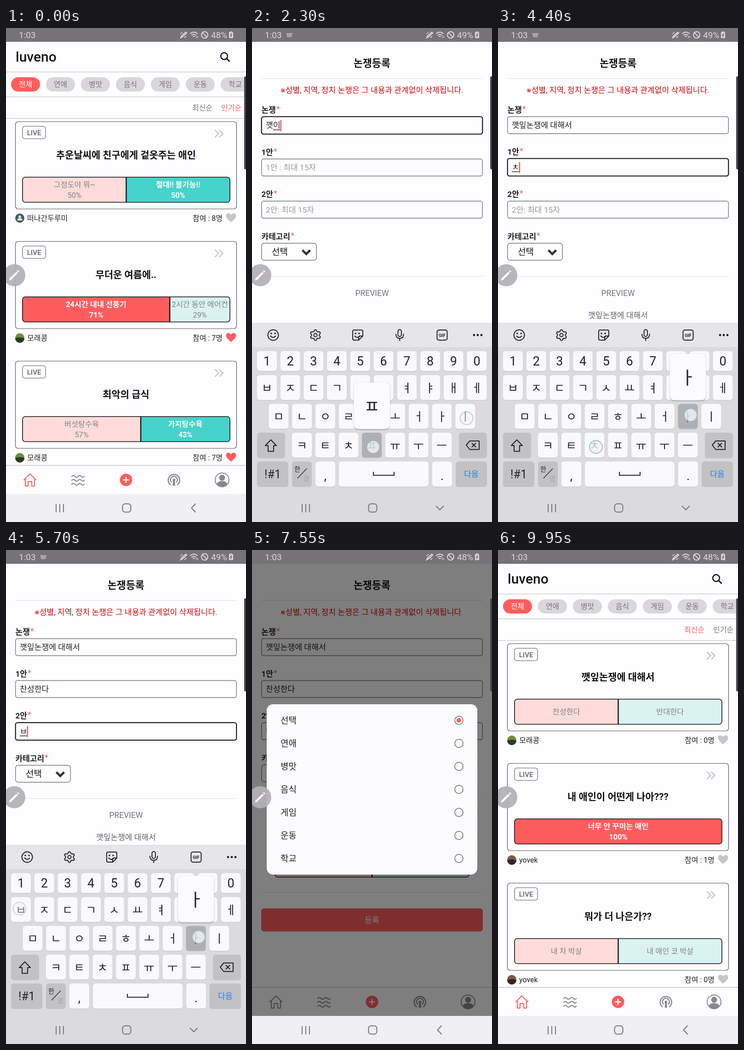
Write an HTML page that moves like this. It is 522 px wide and 1073 px high and loops after 10000 ms.

```html
<!DOCTYPE html>
<html lang="ko">
<head>
<meta charset="utf-8">
<title>Debate app</title>
<style>
html, body { margin: 0; width: 100%; height: 100%; overflow: hidden; background: #fefdff; }
svg { display: block; width: 100vw; height: 100vh; }
text { font-family: Roboto, "Noto Sans CJK KR", "Noto Sans CJK", sans-serif; white-space: pre; }
</style>
</head>
<body>
<svg id="stage" viewBox="0 0 522 1073"></svg>
<script>
const LOOP = 10000;
const RED = '#ff5d5d', PINK = '#ffdcdb', TEAL = '#46d3ca', MINT = '#daf3f0', WHITE = '#fefdff';

// ---------- markup helpers ----------
const text = (x, y, s, size, fill, anchor = 'start', weight = 400, id = '') =>
  `<text x="${x}" y="${y}" font-size="${size}" fill="${fill}" text-anchor="${anchor}" font-weight="${weight}" id="${id}">${s}</text>`;
const mid = (x, y, s, size, fill, weight, id) => text(x, y, s, size, fill, 'middle', weight, id);
const rect = (x, y, w, h, fill, r = 0, extra = '') =>
  `<rect x="${x}" y="${y}" width="${w}" height="${h}" rx="${r}" fill="${fill}" ${extra}/>`;
const circle = (x, y, r, fill, extra = '') => `<circle cx="${x}" cy="${y}" r="${r}" fill="${fill}" ${extra}/>`;
const line = (d, color, w = 2, extra = '') =>
  `<path d="${d}" fill="none" stroke="${color}" stroke-width="${w}" ${extra}/>`;
const shape = (d, fill, extra = '') => `<path d="${d}" fill="${fill}" ${extra}/>`;
const group = (id, body, extra = '') => `<g id="${id}" ${extra}>${body}</g>`;
const at = (x, y, body) => `<g transform="translate(${x} ${y})">${body}</g>`;
const round = 'stroke-linecap="round" stroke-linejoin="round"';

// ---------- home ----------
const CATS = ['연애', '병맛', '음식', '게임', '운동', '학교'];
const KONG = ['모래콩', '#6f8f3c', '#2c3b26'], YOV = ['yovek', '#7a5a4c', '#2f2a2b'];
const HOT = [
  { title: '추운날씨에 친구에게 겉옷주는 애인', a: '그정도야 뭐~', b: '절대!! 불가능!!', pct: 50, win: 'b', by: ['떠나간두루미', '#455a64', ''], n: 8 },
  { title: '무더운 여름에..', a: '24시간 내내 선풍기', b: '2시간 동안 에어컨', pct: 71, win: 'a', by: KONG, n: 7, liked: 1 },
  { title: '최악의 급식', a: '버섯탕수육', b: '가지탕수육', pct: 57, win: 'b', by: KONG, n: 7, liked: 1 }
];
const FRESH = [
  { title: '깻잎논쟁에 대해서', a: '찬성한다', b: '반대한다', by: KONG, n: 0 },
  { title: '내 애인이 어떤게 나아???', a: '너무 안 꾸미는 애인', pct: 100, win: 'a', by: YOV, n: 1 },
  { title: '뭐가 더 나은가??', a: '내 차 박살', b: '내 애인 코 박살', by: YOV, n: 0 }
];
const HEART = 'M0 9.5C-4 5.5-11 1-11-4.500C-11-11-3-12 0-6.500C3-12 11-11 11-4.500C11 1 4 5.500 0 9.500Z';

function choice(cx, label, pct, won) {
  const color = won ? '#fff' : '#858284', weight = won ? 700 : 400;
  if (pct === undefined) return mid(cx, 154, label, 16.3, color, weight);
  return mid(cx, 143, label, 16.3, color, weight) + mid(cx, 166, pct + '%', 16.3, color, weight);
}

function avatar([, main, shade]) {
  if (!shade) return circle(30, 210, 10, main) + circle(30, 207, 3, '#dfe6ea') + shape('M24 215a6 5 0 0 1 12 0z', '#dfe6ea');
  return circle(30, 210, 10, main) + shape('M20 211a10 10 0 0 0 20 0q-10 -4 -20 0z', shade);
}

function card(c, i) {
  const split = 36 + 451 * (c.pct ?? 50) / 100;
  let bar = rect(36, 121, 451, 54.5, c.win === 'a' ? RED : PINK, 6);
  if (c.b) {
    bar += shape(`M${split} 121H481a6 6 0 0 1 6 6V169.500a6 6 0 0 1 -6 6H${split}z`, c.win === 'b' ? TEAL : MINT)
      + line(`M${split} 121v54.500`, '#111', 2.4) + choice((split + 487) / 2, c.b, c.pct && 100 - c.pct, c.win === 'b');
  }
  bar += choice((36 + split) / 2, c.a, c.pct, c.win === 'a') + rect(36, 121, 451, 54.5, 'none', 6, 'stroke="#111" stroke-width="1.6"');
  return at(0, 203 + 260 * i,
    rect(20.5, .5, 481, 189.5, WHITE, 6, 'stroke="#555" stroke-width="1.2"')
    + rect(36, 10.5, 50, 27, 'none', 5, 'stroke="#8a888a" stroke-width="1.6"') + mid(61, 29.5, 'LIVE', 15, '#777577', 700)
    + line('M454.500 18.500l8 8-8 8M463.500 18.500l8 8-8 8', '#c5c3c5', 2.4)
    + mid(261, 80, c.title, 20.9, '#111', 700) + bar + avatar(c.by)
    + text(46, 216, c.by[0], 16, '#222') + text(471, 216, `참여 : ${c.n}명`, 16, '#222', 'end')
    + at(489.5, 209.5, shape(HEART, c.liked ? RED : '#c7c5c7')));
}

function home(id, cards, newest) {
  const chips = ['전체', ...CATS].map((s, i) =>
    rect(11 + 76 * i, 107, 63, 31, i ? '#d9d7d9' : RED, 15.5)
    + mid(42.5 + 76 * i, 128, s, 15.8, i ? '#777577' : '#fff')).join('');
  return group(id, rect(0, 30, 522, 982, WHITE)
    + text(21, 73, 'luveno', 30, '#151515', 'start', 500)
    + circle(474.5, 61, 7.4, 'none', 'stroke="#111" stroke-width="2.5"') + line('M480 66.500l6.500 6.500', '#111', 2.8)
    + line('M0 95.500H522M0 149.500H522M0 196.500H522', '#bbb9bb', 1) + chips
    + text(405, 179, '최신순', 16, newest ? RED : '#777577') + text(468, 179, '인기순', 16, newest ? '#777577' : RED)
    + cards.map(card).join(''));
}

// ---------- form ----------
const FIELDS = [
  { y: 192, label: '논쟁', star: 53, hint: '논쟁 제목 : 최소 5자, 최대 20자', value: '깻잎논쟁에 대해서', from: 1080, to: 4190, runs: [[1640, 130, 12], [3200, 105, 9]] },
  { y: 283, label: '1안', star: 47, hint: '1안 : 최대 15자', value: '찬성한다', from: 4190, to: 5400, runs: [[4300, 92, 11]] },
  { y: 374.5, label: '2안', star: 47, hint: '2안: 최대 15자', value: '반대한다', from: 5400, to: 6480, runs: [[5540, 150, 2], [5775, 70, 8]] }
];
const label = (y, s, star) => text(20.5, y, s, 17, '#222', 'start', 700) + text(star, y - 2, '*', 18, RED);

function form() {
  const inputs = FIELDS.map((f, i) => group('field' + i,
    label(f.y - 8.5, f.label, f.star) + rect(20.7, f.y + .5, 480.6, 37, WHITE, 4.5, `id="box${i}"`)
    + text(30, f.y + 25, '', 17.2, '#222', 'start', 400, 'value' + i))).join('');
  return group('form', rect(0, 30, 522, 982, WHITE)
    + mid(261, 84, '논쟁등록', 21.7, '#151515', 700) + line('M20 109.500H502', '#dddbdd', 1.2)
    + mid(261, 141, '※성별, 지역, 정치 논쟁은 그 내용과 관계없이 삭제됩니다.', 17.1, '#d20808')
    + inputs
    + group('rest', label(457.5, '카테고리', 84)
      + rect(20.7, 466.5, 119.5, 37, WHITE, 6, 'stroke="#777" stroke-width="1.4"')
      + text(43, 492, '선택', 19, '#151515', 'start', 400, 'cat') + line('M109.500 481.500l8.500 8.500 8.500-8.500', '#333', 4.6)
      + line('M20 538.500H502M20 744H502', '#dddbdd', 1.2) + mid(261, 581, 'PREVIEW', 17.5, '#777577')
      + mid(261, 629, '', 17.1, '#666466', 500, 'seen0')
      + rect(50, 663.5, 211, 47, PINK, 5) + rect(261, 663.5, 211, 47, MINT, 5) + rect(255, 663.5, 6, 47, PINK) + rect(261, 663.5, 6, 47, MINT)
      + rect(50, 663.5, 422, 47, 'none', 6, 'stroke="#111" stroke-width="1.5"') + line('M261 663.500v47', '#111', 2.6)
      + mid(155.5, 692.5, '', 17.1, '#858284', 400, 'seen1') + mid(366.5, 692.5, '', 17.1, '#858284', 400, 'seen2')
      + rect(20, 778.5, 482, 50, RED, 6, 'id="send"') + mid(261, 810, '등록', 17.2, '#fff'))
    + rect(0, 0, 0, 1.4, '#222', 0, 'id="under"') + rect(0, 0, 2.6, 24, '#f0605f', 0, 'id="caret"')
    + rect(497, 36, 4.5, 352, '#a09ea0', 2, 'id="scroll"'));
}

function picker() {
  const rows = ['선택', ...CATS].map((s, i) => text(62, 377 + 50 * i, s, 19, '#222')
    + circle(450, 370 + 50 * i, 9, 'none', 'stroke="#888" stroke-width="2"')).join('');
  return group('picker', rect(0, 30, 522, 982, '#000', 0, 'opacity=".5"')
    + rect(32, 335, 458, 370, '#fcfbfd', 14) + rows + circle(450, 370, 5, RED, 'id="radio"'));
}

// ---------- bars ----------
function tabs() {
  const g = '#8a888b';
  const wave = y => `M143 ${y}q3.500-4 7 0t7 0t7 0t6 0`;
  return group('tabs', rect(0, 950, 522, 500, WHITE) + line('M0 950H522', '#c9c7c9', 1.3)
    + line('M39 981.500L52 968.500L65 981.500M42 980V995H48V985H56V995H62V980', g, 2, `id="house" ${round}`)
    + line([974, 982.5, 991].map(wave).join(''), g, 2.2, round)
    + circle(261, 981.500, 13.5, RED) + line('M254.500 981.500h13M261 975v13', '#fff', 2.6)
    + line('M357.500 992a12.500 12.500 0 1 1 15.500 0M360 986.500a7.500 7.500 0 1 1 10.500 0', g, 2.4, round)
    + circle(365.3, 982, 3, g) + shape('M363.500 984h3.600l1 10h-5.600z', g)
    + circle(470, 981.5, 15, WHITE, `stroke="${g}" stroke-width="2"`) + circle(470, 977, 6.5, g)
    + shape('M458.500 990q3-6 11.500-6t11.500 6a14 14 0 0 1 -23 0z', g));
}

const navIcons = () => line('M109 1034v18M117 1034v18M125 1034v18', '#777577', 2)
  + rect(253.5, 1033.5, 18, 18, 'none', 5.5, 'stroke="#777577" stroke-width="2"')
  + line('M412.500 1033l-9 9.500 9 9.500', '#777577', 2, 'id="back"') + line('M400 1038l8.500 8.500 8.500-8.500', '#777577', 2, 'id="down"');

function statusBar() {
  const c = '#dcdadc', dots = [0, 1, 2].map(r => line(`M${75 + r * .8} ${12.5 + 3 * r}H${88 - r * .8}`, c, 2, 'stroke-dasharray="2 .8"')).join('');
  return rect(0, 0, 522, 30, '#757375') + text(28, 22, '1:03', 19, c) + group('kbIcon', dots)
    + line('M380 21l2-4 9-8 2 2-9 8z', c, 2.2) + line('M379 13l5-4M388 21l4-3', c, 1.6)
    + line('M400.500 12.500q8-7 16 0M403.500 16q5-4.500 10 0M406.500 19q2-2 4 0', c, 1.9) + line('M414 17v5M417 17v5', c, 1.2)
    + circle(432, 15, 7, 'none', `stroke="${c}" stroke-width="2"`) + line('M427 10l10 10', c, 2)
    + text(446, 22, '', 19, c, 'start', 400, 'power')
    + rect(485, 9, 9, 13, c, 1) + rect(487.5, 7.5, 4, 2, c) + line('M491 11l-3 4.500h3l-3 4.500', '#666466', 1.4);
}

const overlays = () => rect(518, 105, 8, 202, '#464446', 3)
  + circle(18, 537, 24, '#b3b1b3', 'opacity=".93"') + line('M10 545L24 531', '#fff', 4.5) + line('M25.500 529.500l2-2', '#fff', 4.5)
  + shape('M6.500 548.500l1.500-5.500 4 4z', '#fff');

// ---------- keyboard ----------
const KEY = '#faf9fc', FN = '#c2c1c4', INK = '#222123';
const keys = {};
const addRow = (chars, x, y, h) => [...chars].forEach((k, i) => keys[k] = { x: x + 50.72 * i, y, w: 43, h, fill: KEY });
addRow('1234567890', 11, 702, 43);
addRow('ㅂㅈㄷㄱㅅㅛㅕㅑㅐㅔ', 11, 754, 54);
addRow('ㅁㄴㅇㄹㅎㅗㅓㅏㅣ', 36.5, 816.5, 54);
addRow('ㅋㅌㅊㅍㅠㅜㅡ', 87, 879, 54);
const wide = (k, x, y, w, fill = FN) => keys[k] = { x, y, w, h: 54.5, fill };
wide('shift', 11, 879, 61);
wide('del', 450, 879, 61);
wide('!#1', 11, 941.5, 68);
wide('lang', 87, 941.5, 43);
wide(',', 138, 941.5, 43, KEY);
wide(' ', 189, 941.5, 195, KEY);
wide('.', 392, 941.5, 43, KEY);
wide('다음', 443, 941.5, 68);

const art = {
  shift: line('M41 894.500L53 907H47V919.500H35V907H29Z', INK, 2, round),
  del: line('M466 906L473.500 897H494V915.500H473.500ZM478.500 902l8 8M486.500 902l-8 8', INK, 2, round),
  lang: text(92, 963, '한', 14, INK) + text(112, 984, '영', 14, '#a09fa2') + line('M99 978L119 957', INK, 1.3),
  ' ': line('M264 964v7.500h45v-7.500', INK, 2)
};
function keyArt([k, o], i) {
  const cx = o.x + o.w / 2, cy = o.y + o.h / 2;
  const size = k === '다음' ? 17 : k === '!#1' ? 25 : 27;
  const face = art[k] ?? mid(cx, cy + (',.'.includes(k) ? 13 : k === '다음' ? 6 : 9.5), k, /[ㄱ-ㅣ]/.test(k) ? 25 : size, k === '다음' ? '#1b80e4' : INK, /[ㄱ-ㅣ]/.test(k) ? 500 : 400);
  return rect(o.x, o.y + 1, o.w, o.h, '#c3c2c5', 6) + rect(o.x, o.y, o.w, o.h, o.fill, 6, `id="key${i}"`) + face;
}

function gear() {
  let d = '';
  for (let i = 0; i <= 72; i++) {
    const a = i * Math.PI / 36, r = 10 + 1.6 * Math.tanh(2 * Math.cos(6 * a));
    d += `${i ? 'L' : 'M'}${(138 + r * Math.sin(a)).toFixed(1)} ${(667 - r * Math.cos(a)).toFixed(1)}`;
  }
  return line(d + 'Z', INK, 2, round) + circle(138, 667, 3.6, 'none', `stroke="${INK}" stroke-width="2"`);
}

function keyboard() {
  const smile = x => circle(x - 4, 663.5, 1.7, INK) + circle(x + 4, 663.5, 1.7, INK) + line(`M${x - 5.5} 669q5.500 6.500 11 0`, INK, 2, round);
  return group('keyboard', rect(0, 640, 522, 560, '#dbdadd') + rect(0, 640, 522, 53, '#e6e5e8')
    + circle(46, 667, 11.5, 'none', `stroke="${INK}" stroke-width="2"`) + smile(46) + gear()
    + line('M222 656H238q3 0 3 3V669L232 678H222q-3 0-3-3V659q0-3 3-3zM241 669h-6q-3 0-3 3v6', INK, 2) + smile(229)
    + rect(317.5, 655, 7.5, 15, 'none', 3.7, `stroke="${INK}" stroke-width="2"`) + line('M313 665q0 9 8.300 9t8.300-9M321.300 674v5', INK, 2, round)
    + rect(402.5, 656, 22, 22, 'none', 4, `stroke="${INK}" stroke-width="2"`) + mid(413.5, 670.5, 'GIF', 9.5, INK, 700)
    + [483, 491, 499].map(x => circle(x, 667, 2.4, INK)).join('')
    + Object.entries(keys).map(keyArt).join('')
    + group('popup', rect(-39.5, 3, 79, 101, '#00000022', 10) + rect(-40.5, -.5, 81, 102, '#0000001a', 10)
      + rect(-39.5, 0, 79, 101, '#fcfbfe', 10) + mid(0, 65, '', 38, INK, 500, 'bubble')));
}

// ---------- typing and touches ----------
const LEAD = 'ㄱㄲㄴㄷㄸㄹㅁㅂㅃㅅㅆㅇㅈㅉㅊㅋㅌㅍㅎ';
const VOWEL = 'ㅏㅐㅑㅒㅓㅔㅕㅖㅗㅘㅙㅚㅛㅜㅝㅞㅟㅠㅡㅢㅣ';
const TAIL = ' ㄱㄲㄳㄴㄵㄶㄷㄹㄺㄻㄼㄽㄾㄿㅀㅁㅂㅄㅅㅆㅇㅈㅊㅋㅌㅍㅎ';
const HANGUL = 0xac00, chr = n => String.fromCharCode(HANGUL + n);

// Each stroke is [key, text so far]; a lead consonant first joins an open syllable.
function strokes(s) {
  const out = [];
  let done = '';
  for (const c of s) {
    if (c !== ' ') {
      const n = c.charCodeAt(0) - HANGUL, tail = n % 28, lead = LEAD[n / 588 | 0];
      const prev = done.charCodeAt(done.length - 1) - HANGUL;
      const joins = prev >= 0 && prev % 28 === 0;
      out.push([lead, joins ? done.slice(0, -1) + chr(prev + TAIL.indexOf(lead)) : done + lead]);
      out.push([VOWEL[(n % 588) / 28 | 0], done + chr(n - tail)]);
      if (tail) out.push([TAIL[tail], done + c]);
    } else out.push([' ', done + ' ']);
    done += c;
  }
  return out;
}

const taps = [[430, 261, 982], [1020, 210, 213], [5350, 240, 396], [6400, 408, 1042],
  [7270, 88, 486], [8120, 300, 420], [8770, 262, 804]].map(([t, x, y]) => ({ t, x, y }));
const NUDGE = { 'ㅇ': [-11, 13], 'ㅏ': [6, -3], 'ㅂ': [-3, -2] };
function press(t, key, shown = key) {
  const o = keys[key], [dx, dy] = NUDGE[key] ?? [3, 4];
  taps.push({ t, key, shown, x: o.x + o.w / 2 + dx, y: o.y + o.h / 2 + dy });
}
press(1510, 'shift');
press(4150, '다음');
for (const f of FIELDS) {
  const times = f.runs.flatMap(([t, step, n]) => Array.from({ length: n }, (_, i) => t + i * step));
  f.steps = strokes(f.value).map(([key, s], i) => {
    press(times[i], key === 'ㄲ' ? 'ㄱ' : key, key);
    return [times[i] + 20, s];
  });
}

// ---------- stage ----------
const stage = document.getElementById('stage');
const DOTS = 4;
stage.innerHTML = home('hot', HOT, false) + home('fresh', FRESH, true) + form() + tabs()
  + rect(0, 1012, 522, 61, '#f0eff1') + keyboard() + navIcons() + picker() + statusBar() + overlays()
  + Array.from({ length: DOTS }, (_, i) => circle(0, 0, 14, '#f3f5f8cc', `id="dot${i}" stroke="#9db9cf" stroke-width="2"`)).join('');

const ui = {};
stage.querySelectorAll('[id]').forEach(e => { if (e.id) ui[e.id] = e; });
const set = (id, attrs) => { for (const k in attrs) ui[id].setAttribute(k, attrs[k]); };
const show = (id, on) => { ui[id].style.display = on ? '' : 'none'; };
const put = (id, s) => { if (ui[id].textContent !== s) ui[id].textContent = s; };
const ramp = (t, a, b) => Math.min(1, Math.max(0, (t - a) / (b - a)));
const within = (t, a, b) => t >= a && t < b;

function drawForm(t) {
  const focus = FIELDS.findIndex(f => within(t, f.from, f.to));
  const shift = i => `translate(0 ${focus >= 0 && focus < i ? 1 : 0})`;
  FIELDS.forEach((f, i) => {
    const typed = f.steps.filter(s => s[0] <= t).pop()?.[1] ?? '', on = i === focus;
    set('field' + i, { transform: shift(i) });
    set('box' + i, { stroke: on ? '#111' : '#777', 'stroke-width': on ? 2.1 : 1.4, height: on ? 38 : 37 });
    put('value' + i, typed || f.hint);
    set('value' + i, { fill: typed ? '#222' : '#9b999b' });
    put('seen' + i, t >= f.to ? typed : '');
    if (!on) return;
    const w = typed ? ui['value' + i].getComputedTextLength() : 0;
    const last = typed && !typed.endsWith(' ') ? ui['value' + i].getSubStringLength(typed.length - 1, 1) : 0;
    set('caret', { x: 29.700 + w, y: f.y + 8 });
    set('under', { x: 30 + w - last, y: f.y + 28.5, width: last });
  });
  show('caret', focus >= 0);
  show('under', focus >= 0);
  set('rest', { transform: shift(3) });
  put('cat', t >= 8250 ? '연애' : '선택');
  show('scroll', within(t, 1180, 1450));
  set('send', { fill: within(t, 8770, 8870) ? '#ee5252' : RED });
}

function drawKeyboard(t) {
  const opening = ramp(t, 1150, 1330), closing = ramp(t, 6500, 6625);
  show('keyboard', opening > 0 && closing < 1);
  set('keyboard', {
    transform: `translate(0 ${156 * (1 - opening) + 87 * closing})`,
    opacity: Math.min(1, opening * 2) * (1 - closing)
  });
  const held = taps.filter(p => p.key && within(t, p.t, p.t + 85)).pop();
  Object.entries(keys).forEach(([k, o], i) => set('key' + i, { fill: held?.key === k ? '#b0afb2' : o.fill }));
  const bubble = held && /[ㄱ-ㅣ]/.test(held.key);
  show('popup', bubble);
  if (bubble) {
    const o = keys[held.key];
    set('popup', { transform: `translate(${o.x + o.w / 2} ${o.y - 109})` });
    put('bubble', held.shown);
  }
}

function drawDots(t) {
  const live = taps.filter(p => within(t, p.t, p.t + 240));
  for (let i = 0; i < DOTS; i++) {
    const p = live[i];
    show('dot' + i, p);
    if (p) set('dot' + i, { cx: p.x, cy: p.y, opacity: 1 - ramp(t, p.t + 90, p.t + 240) });
  }
}

function draw(t) {
  const first = t < 620, last = t >= 9050, kb = within(t, 1200, 6500);
  show('hot', first);
  show('fresh', last);
  show('form', !first && !last);
  if (!first && !last) drawForm(t);
  show('tabs', !within(t, 1400, 6720));
  set('tabs', { transform: `translate(0 ${within(t, 1220, 1400) ? -372 : 0})` });
  set('house', { stroke: first || last ? RED : '#8a888b' });
  drawKeyboard(t);
  show('back', !kb);
  show('down', kb);
  const fade = ramp(t, 7400, 7520) * (1 - ramp(t, 8220, 8330));
  show('picker', fade > 0);
  set('picker', { opacity: fade });
  set('radio', { cy: t >= 8140 ? 420 : 370 });
  show('kbIcon', within(t, 1420, 6520));
  put('power', within(t, 700, 6000) ? '49%' : '48%');
  drawDots(t);
}

const start = performance.now();
function tick() {
  draw((performance.now() - start) % LOOP);
  requestAnimationFrame(tick);
}
tick();
</script>
</body>
</html>
```
